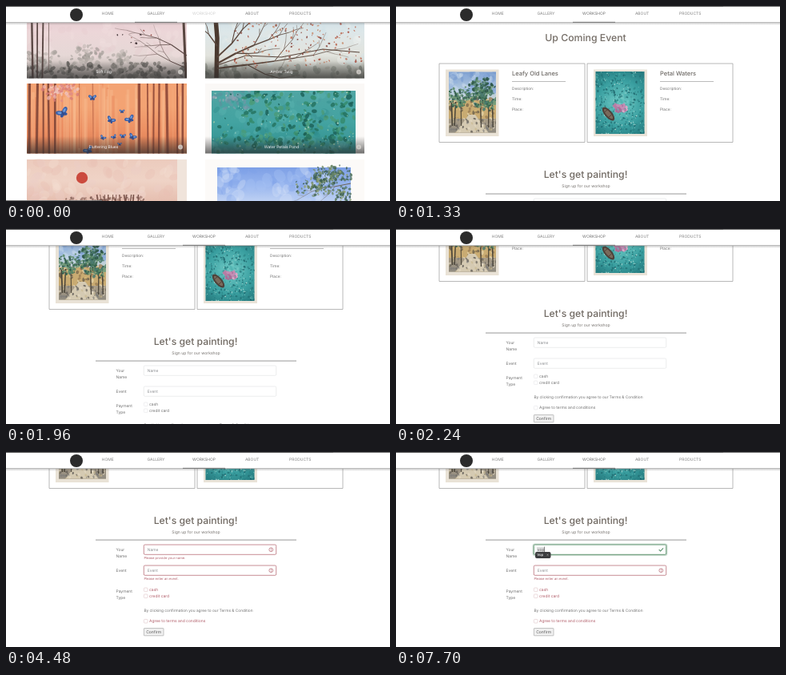
An HTML page with a canvas that plays this animation: 480 by 244 pixels, repeating every 8000 ms.

```html
<!DOCTYPE html>
<html lang="en">
<head>
<meta charset="utf-8">
<title>Workshop sign-up</title>
<style>
  html, body { margin: 0; width: 100%; height: 100%; overflow: hidden; background: #fff; }
  canvas { display: block; width: 480px; height: 244px; }
</style>
</head>
<body>
<canvas id="stage"></canvas>
<script>
const LOOP = 8000, STEP = 70, W = 480, H = 244;
const PAGE_SWITCH = 210, FOCUS = 3290, INVALID = 4340, REFOCUS = 5320, TYPING = 5880, SUGGEST = 6300;
const SCROLL = [[1330, 0], [1680, 35], [2240, 105], [2590, 119], [3150, 125]];
const KEY_TIMES = [5880, 6020, 6160];
const ENTRY = 'vop';

const GREY = [228, 229, 231], BLUE = [150, 190, 228], RED = [176, 92, 104], GREEN = [86, 142, 104];
const INK = [112, 112, 112];

const canvas = document.getElementById('stage');
const scale = window.devicePixelRatio || 1;
canvas.width = W * scale;
canvas.height = H * scale;
const ctx = canvas.getContext('2d');
ctx.scale(scale, scale);
ctx.textBaseline = 'middle';
ctx.textRendering = 'geometricPrecision';

let seed = 1;
const rnd = (lo = 0, hi = 1) => {
  seed = (seed * 16807) % 2147483647;
  return lo + (hi - lo) * seed / 2147483647;
};
const pick = list => list[Math.floor(rnd(0, list.length))];
const clamp = v => Math.max(0, Math.min(1, v));
const ramp = (t, start, length = 140) => clamp((t - start + STEP) / length);
const mix = (a, b, p) => a.map((v, i) => v + (b[i] - v) * p);
const rgb = (c, alpha = 1) => `rgba(${c.map(Math.round).join()},${alpha})`;

function scrollAt(t) {
  for (let i = 1; i < SCROLL.length; i++) {
    const [t0, y0] = SCROLL[i - 1], [t1, y1] = SCROLL[i];
    if (t < t1) return y0 + (y1 - y0) * clamp((t - t0) / (t1 - t0));
  }
  return SCROLL[SCROLL.length - 1][1];
}

// Drawing helpers

function text(str, x, y, size = 4.95, color = rgb(INK), align = 'left', weight = 400) {
  ctx.font = `${weight} ${size}px Inter, "Open Sans", sans-serif`;
  ctx.fillStyle = color;
  ctx.textAlign = align;
  ctx.fillText(str, x, y);
}

function rect(x, y, w, h, fill) {
  ctx.fillStyle = fill;
  ctx.fillRect(x, y, w, h);
}

function box(x, y, w, h, radius, stroke, width = 0.7, fill) {
  ctx.beginPath();
  ctx.roundRect(x, y, w, h, radius);
  if (fill) { ctx.fillStyle = fill; ctx.fill(); }
  if (stroke) { ctx.strokeStyle = stroke; ctx.lineWidth = width; ctx.stroke(); }
}

function oval(x, y, rx, ry, fill, turn = 0) {
  ctx.beginPath();
  ctx.ellipse(x, y, rx, ry, turn, 0, Math.PI * 2);
  ctx.fillStyle = fill;
  ctx.fill();
}

function path(points, color, width) {
  ctx.beginPath();
  for (let i = 0; i < points.length; i += 2) ctx.lineTo(points[i], points[i + 1]);
  ctx.strokeStyle = color;
  ctx.lineWidth = width;
  ctx.stroke();
}

function wash(x, y, w, h, ...colors) {
  const g = ctx.createLinearGradient(0, y, 0, y + h);
  colors.forEach((c, i) => g.addColorStop(i / (colors.length - 1), c));
  rect(x, y, w, h, g);
}

function daubs(count, x, y, w, h, size, colors) {
  for (let i = 0; i < count; i++) {
    const r = rnd(size * 0.5, size);
    oval(x + rnd(0, w), y + rnd(0, h), r, r * rnd(0.45, 0.9), pick(colors), rnd(0, 3));
  }
}

// Daubs gathered in a rounded mass, denser towards the middle
function cluster(count, x, y, rx, ry, size, colors) {
  for (let i = 0; i < count; i++) {
    const angle = rnd(0, Math.PI * 2), d = rnd(), r = rnd(size * 0.5, size);
    oval(x + Math.cos(angle) * rx * d, y + Math.sin(angle) * ry * d, r, r * rnd(0.5, 0.9), pick(colors), rnd(0, 3));
  }
}

function trunks(count, x, w, top, bottom, color, widest = 3) {
  for (let i = 0; i < count; i++) {
    const tx = x + (i + rnd(0.2, 0.8)) * w / count;
    path([tx, top, tx + rnd(-1.5, 1.5), bottom], color, rnd(widest * 0.4, widest));
  }
}

function branch(x, y, angle, length, width, color) {
  if (length < 7) return;
  const x1 = x + Math.cos(angle) * length, y1 = y + Math.sin(angle) * length;
  path([x, y, x1, y1], color, width);
  branch(x1, y1, angle + rnd(-0.25, 0.2), length * rnd(0.72, 0.9), width * 0.78, color);
  branch(x1, y1, angle + pick([-1, 1]) * rnd(0.4, 0.8), length * rnd(0.5, 0.7), width * 0.6, color);
}

function clipped(x, y, w, h, draw) {
  ctx.save();
  ctx.beginPath();
  ctx.rect(x, y, w, h);
  ctx.clip();
  draw();
  ctx.restore();
}

// Gallery paintings, drawn in stage coordinates

function mistyWood() {
  wash(26, 3, 200, 88, '#e2c5cb', '#ecd6d8', '#e6d8d6', '#b3aba6');
  daubs(60, 26, 22, 200, 40, 7, ['#f0dfdd55', '#e4c8cd55']);
  const haze = ['#a5a09b88', '#8f8b8688', '#b9b2ad88'];
  cluster(60, 45, 68, 26, 14, 3.5, haze);
  cluster(60, 102, 64, 22, 16, 3.5, haze);
  cluster(45, 142, 69, 16, 14, 3.5, haze);
  daubs(130, 26, 71, 200, 20, 4, ['#6d6a65aa', '#87837daa', '#55524faa']);
  trunks(3, 27, 22, 3, 90, '#5b4845', 2.6);
  trunks(1, 50, 10, 3, 80, '#86736f', 1.6);
  branch(226, 62, 3.75, 24, 1.2, '#5b4744');
  branch(226, 78, 3.55, 22, 1, '#5b4744');
  path([222, 20, 225, 90], '#57453f', 3);
  daubs(9, 122, 28, 62, 24, 1.5, ['#46393b', '#9b5752']);
}

function redTwigs() {
  wash(249, 3, 199, 88, '#c6dae4', '#dde7e9', '#e2e3dd', '#a3a59b');
  daubs(50, 249, 22, 199, 50, 8, ['#eef1ee66', '#cfe0e666', '#dfe3de66']);
  daubs(60, 249, 74, 199, 16, 5, ['#8d928899', '#a8a99d99', '#71756c99']);
  const bark = '#59453a';
  path([261, 3, 264, 40, 263, 90], '#4a392f', 5.5);
  branch(264, 72, -0.5, 27, 2.2, bark);
  branch(264, 64, -0.75, 25, 1.8, bark);
  branch(264, 78, -0.12, 38, 2, bark);
  branch(264, 50, -2.2, 18, 1.4, bark);
  path([264, 74, 300, 62, 344, 64, 396, 54, 442, 58], bark, 1.2);
  daubs(150, 285, 20, 160, 58, 1.6, ['#a8493acc', '#bb6148cc', '#833c33cc', '#c78a6bcc']);
}

function butterfly(x, y, s, turn) {
  ctx.save();
  ctx.translate(x, y);
  ctx.rotate(turn);
  for (const side of [-1, 1]) {
    oval(side * s * 0.55, -s * 0.3, s * 0.65, s * 0.38, '#3a5fa8', side * -0.6);
    oval(side * s * 0.5, -s * 0.3, s * 0.38, s * 0.2, '#6f9bd8', side * -0.6);
    oval(side * s * 0.32, s * 0.3, s * 0.38, s * 0.28, '#31529b', side * 0.8);
  }
  path([0, -s * 0.5, 0, s * 0.6], '#26345d', 0.6);
  ctx.restore();
}

function blueWings() {
  wash(26, 97, 200, 88, '#f3a374', '#f3a373', '#ec9063', '#d5764f');
  for (let i = 0; i < 60; i++) {
    rect(26 + rnd(0, 200), 97 + rnd(0, 20), rnd(1, 5), 88, pick(['#f9c39a55', '#e6805566', '#f6b28555']));
  }
  trunks(5, 27, 38, 97, 185, '#8a4c3b', 3.4);
  trunks(2, 84, 30, 97, 178, '#cc7753', 2);
  trunks(7, 160, 66, 97, 185, '#964f3c', 3.4);
  cluster(75, 68, 107, 24, 13, 2.8, ['#efb5aecc', '#e28c85cc', '#f2cbc0cc', '#d97d78cc']);
  [[71, 134, 7], [108, 115, 4.5], [131, 143, 5], [155, 142, 5.5], [145, 132, 3], [121, 165, 3.5], [135, 164, 3.2],
   [146, 163, 3.5], [158, 164, 4.5], [103, 181, 5.5], [142, 173, 2.5]]
    .forEach(([x, y, s], i) => butterfly(x, y, s, (i % 3 - 1) * 0.5));
}

function lilyPads() {
  rect(249, 97, 199, 88, '#faf8f6');
  clipped(257, 106, 180, 79, () => {
    wash(257, 106, 180, 79, '#4fa5a3', '#43a3a1', '#2f8d8c');
    daubs(120, 257, 106, 180, 79, 6, ['#62b8b455', '#2d8a8b66', '#4a9ea066']);
    cluster(60, 285, 116, 32, 14, 3.5, ['#8b9fb088', '#7396a888', '#a5a9ba88', '#5f8f9c88']);
    daubs(170, 296, 106, 141, 70, 4, ['#24715dcc', '#348a6bcc', '#1b6057cc', '#4c9c79cc']);
    daubs(70, 262, 148, 175, 37, 3.4, ['#1e6a5dcc', '#2c8069cc', '#48a08acc']);
    daubs(110, 259, 108, 176, 72, 1.3, ['#b2d4c1', '#8cc3a6', '#74bdb5', '#1d6860']);
  });
}

function redSun() {
  wash(26, 192, 200, 52, '#eccbbd', '#efd3c6', '#e6bfb0');
  daubs(70, 26, 192, 188, 52, 9, ['#f3ddd155', '#e6bdb055', '#e9cdc655']);
  rect(214, 192, 12, 52, '#f0e4db');
  oval(95, 215, 7.2, 7.2, '#cb4a3e');
  daubs(60, 74, 239, 100, 6, 2.2, ['#725047aa', '#9b7166aa']);
  trunks(12, 112, 55, 236, 244, '#7d574d', 1.8);
}

function blueSky() {
  rect(249, 192, 199, 52, '#fcfaf8');
  clipped(264, 202, 167, 42, () => {
    wash(264, 202, 167, 42, '#7ea0e6', '#96b4ee', '#bdd0f3');
    daubs(60, 264, 202, 140, 42, 9, ['#a9c2f255', '#7d9fe655', '#d5e1f555']);
    branch(431, 222, 2.95, 20, 1, '#6d6355');
  });
  const leaves = ['#4e6e59cc', '#718b65cc', '#395a4bcc', '#91a276cc', '#5d7d6ccc'];
  cluster(150, 408, 211, 26, 13, 2.2, leaves);
  cluster(110, 386, 226, 27, 13, 2, leaves);
  cluster(60, 420, 236, 14, 10, 2, leaves);
}

const TILES = [
  [26, 3, mistyWood, 'Soft Fog'], [249, 3, redTwigs, 'Amber Twig'],
  [26, 97, blueWings, 'Fluttering Blues'], [249, 97, lilyPads, 'Water Petals Pond'],
  [26, 191.5, redSun], [249, 191.5, blueSky]
];

function gallery() {
  for (const [x, y, paint, caption] of TILES) {
    const w = x < 200 ? 200 : 199;
    clipped(x, y, w, 87.5, paint);
    if (!caption) continue;
    wash(x, y + 66, w, 21.5, 'rgba(45,45,45,0)', 'rgba(45,45,45,.68)');
    text(caption, x + w / 2 - 4, y + 79.5, 5, '#f3f3f3', 'center');
    oval(x + 192, y + 79.5, 3, 3, '#d8d4d0cc');
    text('i', x + 192, y + 79.6, 4, '#777', 'center');
  }
  rect(0, 243, 120, 1, '#777');
}

// Workshop page, drawn in page coordinates

function streetPainting() {
  rect(62, 79.5, 66.5, 83.5, '#e9e2d6');
  clipped(66, 82.5, 59, 76, () => {
    wash(66, 82, 59, 77, '#7d9fd0', '#b9cfe2', '#d6cfb2', '#b5a888');
    daubs(60, 66, 82, 59, 26, 5, ['#6f94cc77', '#c9daea88', '#8fb0dc77']);
    rect(66, 118, 59, 24, '#c9ab72');
    daubs(70, 66, 116, 59, 26, 3, ['#dabb77cc', '#9a7d55cc', '#e0cfa5cc', '#6b614dcc']);
    wash(66, 141, 59, 18, '#a99c86', '#8f8a80');
    ctx.beginPath();
    [[91, 136], [99, 136], [116, 159], [74, 159]].forEach(p => ctx.lineTo(...p));
    ctx.fillStyle = '#d5cab2';
    ctx.fill();
    daubs(80, 66, 140, 59, 19, 2, ['#e6dcc5aa', '#7d7b78aa', '#c9b98faa', '#5f5b55aa']);
    trunks(3, 67, 18, 120, 150, '#4d473a', 1.8);
    trunks(3, 104, 20, 118, 152, '#453f35', 2);
    const leaves = ['#3e6f56dd', '#5b8a68dd', '#2c5547dd', '#78a07ddd', '#4a7a70dd'];
    cluster(190, 106, 108, 21, 19, 2.4, leaves);
    cluster(110, 76, 115, 14, 13, 2.2, leaves);
    cluster(50, 116, 122, 10, 9, 2.2, leaves);
  });
}

function pondPainting() {
  rect(247, 79.5, 67, 83.5, '#e9e3d8');
  clipped(249.5, 82, 61, 78, () => {
    const water = ctx.createRadialGradient(280, 122, 8, 280, 122, 50);
    ['#62c0bd', '#3a9fa0', '#23757a'].forEach((c, i) => water.addColorStop(i / 2, c));
    rect(249, 82, 62, 78, water);
    daubs(330, 249, 82, 62, 78, 1.7, ['#1f6b70aa', '#2b8486aa', '#48a9a6aa', '#185c63aa']);
    daubs(130, 249, 82, 62, 78, 0.9, ['#9ad3cb', '#6fbdb7', '#b9ddd6']);
    cluster(50, 280, 122, 17, 15, 2.6, ['#5fbfbb99', '#4bb0ae99', '#7accc699']);
    cluster(40, 281, 127, 8.5, 6.5, 2.8, ['#c48db4', '#b67ba3', '#d5aac6', '#a66f98']);
    oval(265.5, 135, 10.5, 4.6, '#4e4039', 0.85);
    oval(265.5, 135, 8, 2.6, '#7a6a5b', 0.85);
    path([260.5, 133, 264, 130], '#463931', 0.8);
    path([266, 139, 269.5, 136], '#463931', 0.8);
  });
}

function eventCard(x, title) {
  box(x, 72, 182, 98.5, 0, '#a6a6a6', 0.8);
  text(title, x + 91, 85, 7.5, '#6c6864', 'left', 500);
  rect(x + 91, 94, 67, 0.8, '#aaa');
  ['Description:', 'Time:', 'Place:'].forEach((s, i) => text(s, x + 91, 103.8 + i * 12.7, 4.8));
}

function field(y, color, glow, placeholder, value) {
  if (glow) box(171.5, y - 0.5, 167, 13.5, 2, rgb(color, 0.3 * glow), 2);
  box(172.3, y, 165.4, 12.3, 1.3, rgb(color), 0.7 + 0.2 * glow, '#fff');
  if (value) {
    ctx.font = '400 4.95px Inter, sans-serif';
    rect(176, y + 3, ctx.measureText(value).width + 1, 7, '#dcdddd');
  }
  text(value || placeholder, 176.8, y + 6.6, 4.95, value ? '#666' : '#8b8e91');
}

function alertIcon(y, alpha) {
  const color = rgb(RED, alpha);
  ctx.beginPath();
  ctx.arc(331.3, y, 2.4, 0, Math.PI * 2);
  ctx.strokeStyle = color;
  ctx.lineWidth = 0.7;
  ctx.stroke();
  rect(331, y - 1.4, 0.7, 1.6, color);
  rect(331, y + 0.8, 0.7, 0.7, color);
}

function option(label, y, color, border) {
  box(172.4, y - 2.2, 4.6, 4.6, 1, border, 0.6);
  text(label, 179, y, 4.95, color);
}

function caretVisible(t) {
  if (t < INVALID) return t >= FOCUS && (t < 3780 || t >= 4130);
  return t >= REFOCUS && t < 5670 || t >= TYPING && t < 7140 || t >= 7700;
}

function signUp(t) {
  const invalid = ramp(t, INVALID), valid = ramp(t, TYPING);
  const focus = t < INVALID ? ramp(t, FOCUS) : t < REFOCUS ? 1 - invalid : ramp(t, REFOCUS);
  const typed = ENTRY.slice(0, KEY_TIMES.filter(k => t >= k).length);
  const shift = t >= INVALID ? 8 : 0;
  const red = rgb(RED, invalid);
  const nameColor = mix(mix(mix(GREY, BLUE, focus), RED, invalid), GREEN, valid);

  text("Let's get painting!", 237, 211, 12.2, '#706962', 'center', 500);
  text('Sign up for our workshop', 237.5, 225.5, 5.05, '#75716d', 'center');
  rect(112, 234.6, 251, 0.9, '#8c8c8c');

  text('Your', 137.5, 247.6);
  text('Name', 137.5, 255.6);
  field(241, nameColor, focus, 'Name', typed);
  if (caretVisible(t)) {
    const width = typed ? ctx.measureText(typed).width : 0;
    rect(176.4 + width, 243.5, 0.7, 7.2, '#555');
  }

  text('Event', 137.5, 273.6);
  field(267, mix(GREY, RED, invalid), 0, 'Event', '');

  if (invalid) {
    if (valid < 1) {
      alertIcon(247.2, invalid * (1 - valid));
      text('Please provide your name.', 172.4, 258.2, 4.15, rgb(RED, invalid * (1 - valid)));
    }
    alertIcon(273.2, invalid);
    text('Please enter an event.', 172.4, 284.2, 4.15, red);
  }
  if (valid) path([328.7, 247.1, 330.6, 249, 334, 245.3], rgb(GREEN, valid), 1.1);

  const labelColor = rgb(mix(INK, RED, invalid));
  const checkColor = rgb(mix(GREY, [224, 196, 200], invalid));
  text('Payment', 137.5, 291.6 + shift);
  text('Type', 137.5, 299.6 + shift);
  option('cash', 289.2 + shift, labelColor, checkColor);
  option('credit card', 297.2 + shift, labelColor, checkColor);
  text('By clicking confirmation you agree to our Terms & Condition', 172.4, 315.2 + shift, 4.8);
  option('Agree to terms and conditions', 328.6 + shift, labelColor, checkColor);
  box(172.4, 337.6 + shift, 24.6, 9.2, 0.5, '#aaa', 0.7, '#f1f1f1');
  text('Confirm', 184.7, 342.4 + shift, 5, '#555', 'center');

  if (t >= SUGGEST) {
    box(174, 250, 19.5, 8, 2, null, 0, '#3c3d3f');
    text('Vop', 176.2, 254.1, 4.3, '#fff', 'left', 500);
    text('×', 189.6, 254, 4.6, '#bbb', 'center');
  }
}

function workshop(t) {
  ctx.save();
  ctx.translate(0, -scrollAt(t));
  text('Up Coming Event', 237, 40, 12.25, '#746d66', 'center', 500);
  eventCard(54, 'Leafy Old Lanes');
  eventCard(239, 'Petal Waters');
  streetPainting();
  pondPainting();
  signUp(t);
  ctx.restore();
}

function navBar(t) {
  const onGallery = t < PAGE_SWITCH;
  wash(0, 20, W, 4, 'rgba(90,90,90,.4)', 'rgba(90,90,90,0)');
  rect(0, 0, W, 20.5, '#fff');
  rect(0, 20, W, 1, '#bcbcbc');
  rect(0, 0, W, 1, '#6c6c6c');
  rect(0, 0, 409, 1, '#565656');
  oval(88, 11, 8, 8, '#2b2b2b');
  ['HOME', 'GALLERY', 'WORKSHOP', 'ABOUT', 'PRODUCTS'].forEach((item, i) => {
    const color = i !== 2 ? '#7d7d7d' : onGallery ? '#cfcfcf' : '#6c6c6c';
    text(item, 127.3 + i * 60.1, 9.8, 4.95, color, 'center');
  });
  rect(onGallery ? 161 : 221, 19.8, 53, 1.1, '#777');
}

let shown = -1;

function render() {
  const t = Math.floor(performance.now() % LOOP / STEP) * STEP;
  if (t !== shown) {
    shown = t;
    seed = 4711;
    rect(0, 0, W, H, '#fff');
    if (t < PAGE_SWITCH) gallery();
    else workshop(t);
    navBar(t);
  }
  requestAnimationFrame(render);
}
render();
</script>
</body>
</html>
```
